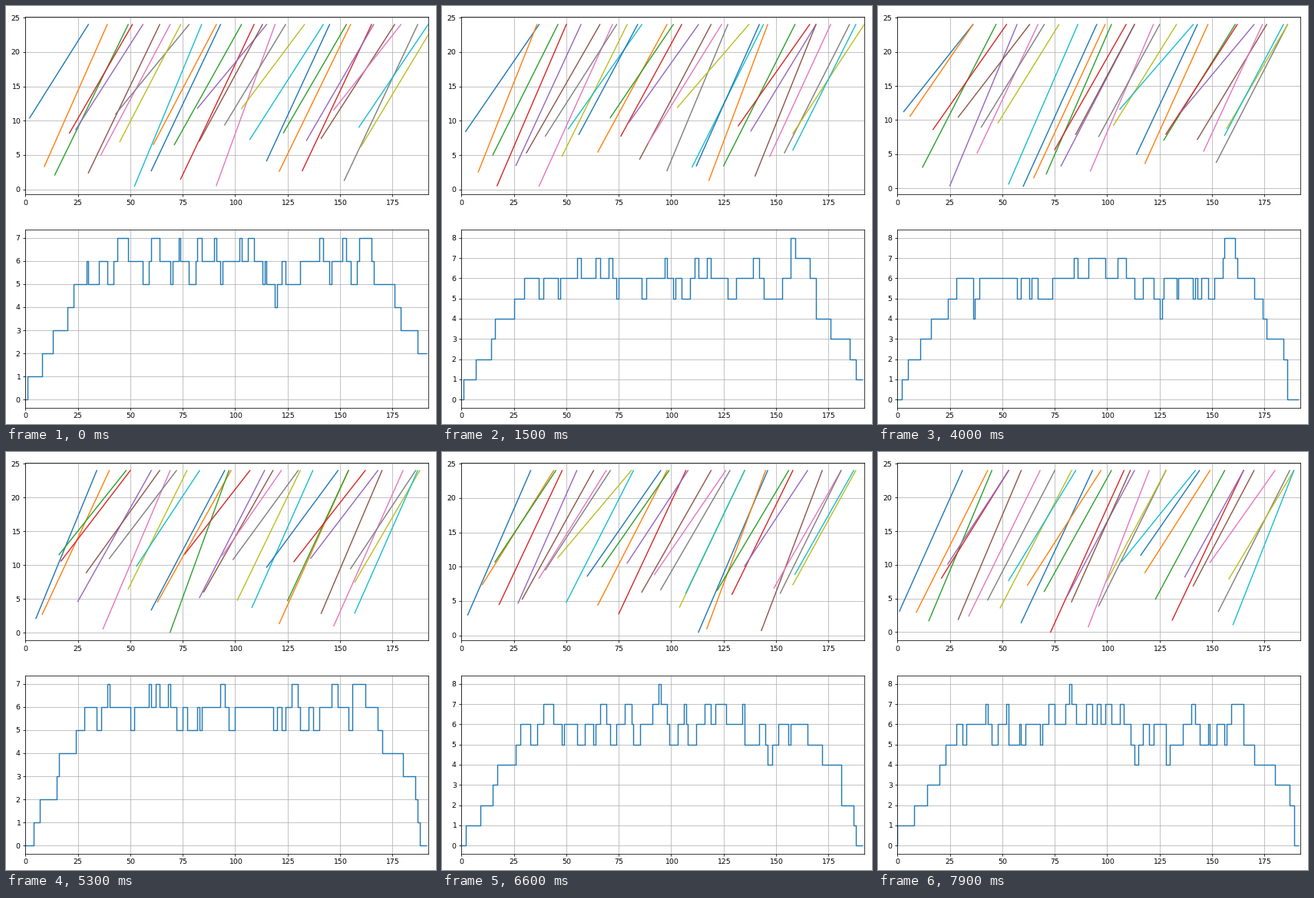
Recreate the animation shown at these times as a matplotlib script. Size 560 by 544 pixels, loop 8 s.

```python
import numpy as np
import matplotlib.pyplot as plt
from matplotlib.animation import FuncAnimation

W, H, DPI = 560, 544, 72
FRAMES, STEP = 80, 100
SLOTS = np.arange(192)
CARS = 30
EMPTY, FULL = 12, 24    # highest arrival level, departure level

# (first animation frame, lowest arrival level, most cars at once)
RUNS = [(0, .45, 7), (13, .5, 8), (26, .65, 7), (40, .3, 8),
        (53, .1, 7), (66, .45, 8), (79, 0, 8)]


def simulate(seed, floor, peak):
    """Evenly spaced arrivals with jitter, redrawn until the peak load fits."""
    rng = np.random.default_rng(seed)
    due = np.minimum(2.3 + 5.56 * np.arange(CARS), 158)
    load = np.zeros(len(SLOTS), int)
    while load.max() != peak:
        start = np.maximum(1, np.rint(due + rng.uniform(-2.5, 2.5, CARS)))
        end = start + rng.integers(28, 36, CARS)
        active = (start[:, None] <= SLOTS) & (SLOTS <= end[:, None])
        load = active.sum(axis=0)
    level = rng.uniform(floor, EMPTY, CARS)
    level[rng.integers(CARS)] = floor
    return start, end, level, load


results = [(first, simulate(seed, floor, peak))
           for seed, (first, floor, peak) in enumerate(RUNS)]

SCALE = .94
plt.rcParams.update({
    "font.family": "DejaVu Sans", "font.size": 10 * SCALE,
    "lines.linewidth": 1.5 * SCALE,
    "axes.linewidth": .8 * SCALE, "grid.linewidth": .8 * SCALE,
    **{f"{axis}tick.major.{key}": 3.5 * SCALE
       for axis in "xy" for key in ("size", "pad")},
})
fig = plt.figure(figsize=(W / DPI, H / DPI), dpi=DPI, facecolor="white")


def panel(top, left=25.3, width=524.5, height=231.4):
    ax = fig.add_axes([left / W, 1 - (top + height) / H, width / W, height / H])
    ax.set_xlim(0, len(SLOTS))
    ax.grid(True)
    return ax


levels, loads = panel(13.6), panel(291.3)
sessions = [levels.plot([0, 1], [0, FULL])[0] for _ in range(CARS)]
(count,) = loads.step(SLOTS, 0 * SLOTS)


def update(frame):
    start, end, level, load = [r for first, r in results if first <= frame][-1]
    for line, s, e, y in zip(sessions, start, end, level):
        line.set_data([s, e], [y, FULL])
    count.set_data(SLOTS, load)
    for ax in (levels, loads):
        ax.relim()
        ax.autoscale_view(scalex=False)
    return [*sessions, count]


anim = FuncAnimation(fig, update, frames=FRAMES, interval=STEP,
                     repeat=True, repeat_delay=0, blit=False)
plt.show()
```
